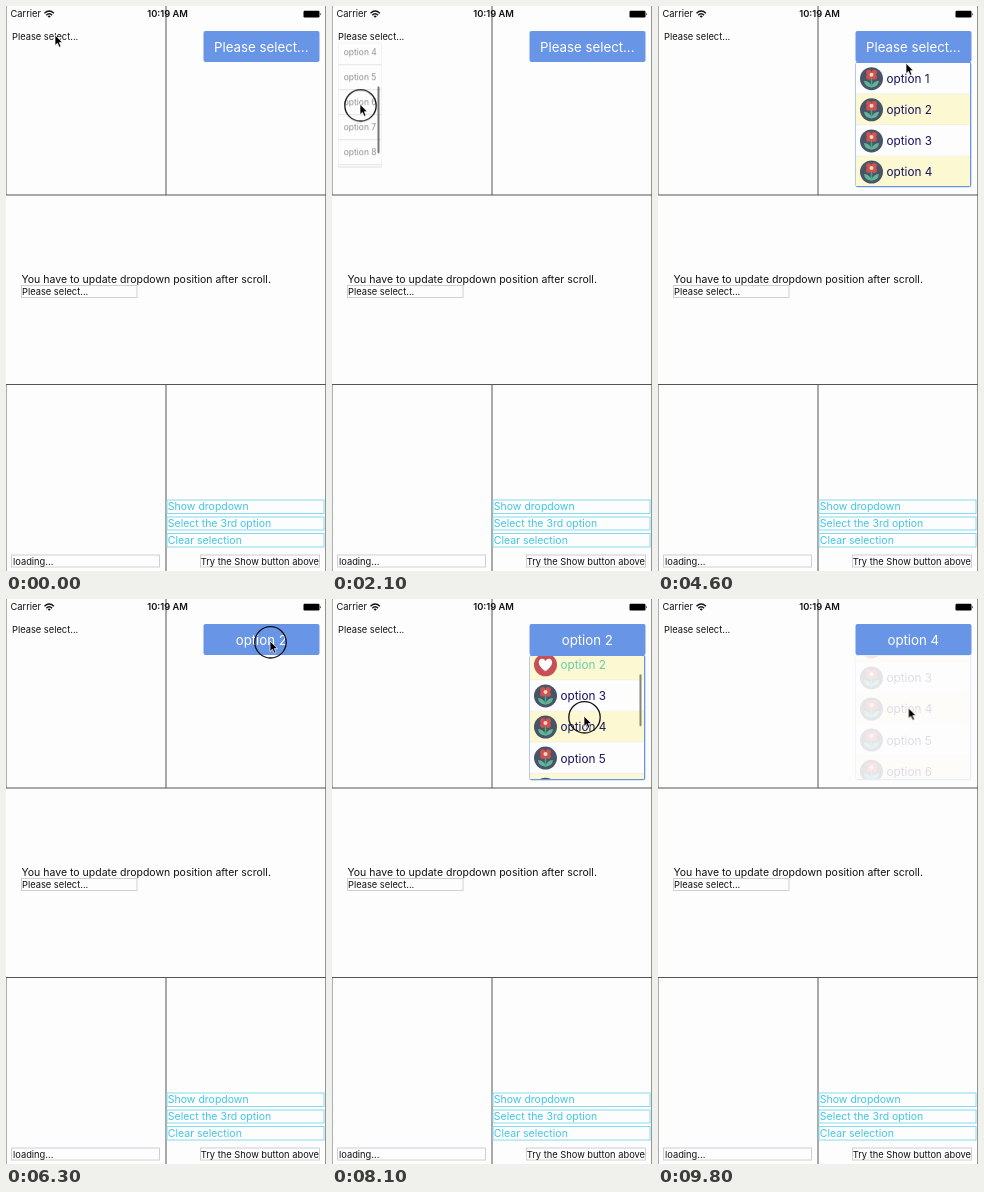
An HTML page that plays this animation: 320x565 px, repeating every 9.9 s.

```html
<!DOCTYPE html>
<html lang="en">
<head>
<meta charset="utf-8">
<title>Dropdown demo</title>
<style>
html, body { margin: 0; width: 100%; height: 100%; overflow: hidden; background: #fefdfe; }
svg { display: block; width: 100%; height: 100%; }
text { font-family: Inter, Roboto, sans-serif; font-size: 9.3px; fill: #111; }
.line { stroke: #555; stroke-width: 1; fill: none; }
.edge { stroke: #8a8a8a; stroke-width: 1; fill: none; }
.box { fill: none; stroke: #d0d0d4; stroke-width: 1; }
.note { font-size: 10.5px; }
.link { font-size: 10.5px; fill: #42c6e2; }
.linkbox { fill: none; stroke: #86dcee; stroke-width: 1; }
.btn text { font-size: 13.25px; fill: #fff; text-anchor: middle; }
.small text { font-size: 8.5px; fill: #8f8f8f; }
.big text { font-size: 11.75px; fill: #16135f; }
.big .picked text { fill: #66cdaa; }

/* 1% = 99 ms */
.anim { animation: 9.9s linear infinite; }
.step { animation-timing-function: step-end; }
.cursor { animation-name: cursor; }
.ring { animation-name: ring; }
.small { animation-name: fadeA; }
.big { animation-name: fadeB; }
.scrollA { animation-name: scrollA; --k: -1px; }
.scrollB { animation-name: scrollB; --k: -1px; }
.barA { --k: .551px; }
.barB { --k: .44px; }
.showA { animation-name: showA; }
.showB { animation-name: showB; }
.label0 { animation-name: label0; }
.label2 { animation-name: label2; }
.label4 { animation-name: label4; }
.picked { animation-name: picked; }

@keyframes cursor {
  0% { transform: translate(49px, 29px); }
  5.05% { transform: translate(49px, 29px); animation-timing-function: ease-in-out; }
  10.1%, 11.1% { transform: translate(28px, 140px); }
  15.2% { transform: translate(28px, 80px); }
  18.2%, 19.2% { transform: translate(28px, 76px); }
  21.21% { transform: translate(28px, 98px); }
  25.25% { transform: translate(28px, 146px); }
  27.3% { transform: translate(28px, 146px); animation-timing-function: ease-in-out; }
  30.2% { transform: translate(97px, 103px); }
  33.3% { transform: translate(97px, 103px); animation-timing-function: ease-in-out; }
  39.4%, 43.4% { transform: translate(252px, 42px); }
  46.46% { transform: translate(248px, 57px); }
  50.5% { transform: translate(245px, 104px); }
  55.6% { transform: translate(245px, 104px); animation-timing-function: ease-in-out; }
  60.6% { transform: translate(264px, 42px); }
  65.7% { transform: translate(264px, 42px); animation-timing-function: ease-in-out; }
  72.7%, 77.8% { transform: translate(252px, 155px); }
  81.82% { transform: translate(252px, 117px); }
  85.9% { transform: translate(252px, 99px); }
  89.9%, 100% { transform: translate(250.5px, 109px); }
}
@keyframes ring {
  0%, 5%, 15.1%, 25.2%, 31.2%, 42.4%, 53.5%, 64.6%, 85.8%, 95.9%, 100% { opacity: 0; }
  3%, 11.1%, 19.1%, 30.2%, 40.3%, 51.5%, 62.5%, 77.7%, 93.9% { opacity: 1; }
}
@keyframes fadeA {
  0%, 5.05%, 33.1%, 100% { opacity: 0; }
  8.1%, 31.3% { opacity: 1; }
}
@keyframes fadeB {
  0%, 42.4%, 56.6%, 64.6%, 99.5%, 100% { opacity: 0; }
  45.4%, 53.5%, 67.7%, 96% { opacity: 1; }
}
@keyframes scrollA {
  0%, 11.1%, 28.3%, 100% { transform: translateY(0); }
  15.2% { transform: translateY(calc(60 * var(--k))); animation-timing-function: ease-out; }
  17.2%, 19.2% { transform: translateY(calc(100 * var(--k))); }
  21.21% { transform: translateY(calc(78 * var(--k))); }
  25.25% { transform: translateY(calc(30 * var(--k))); animation-timing-function: ease-out; }
}
@keyframes scrollB {
  0%, 77.8% { transform: translateY(0); }
  81.82% { transform: translateY(calc(38 * var(--k))); }
  85.9%, 100% { transform: translateY(calc(56 * var(--k))); }
}
@keyframes showA {
  0%, 11%, 30%, 100% { opacity: 0; }
  11.1%, 28.3% { opacity: 1; }
}
@keyframes showB {
  0%, 77.7%, 89%, 100% { opacity: 0; }
  77.8%, 87% { opacity: 1; }
}
@keyframes label0 { 0% { opacity: 1; } 53.5%, 100% { opacity: 0; } }
@keyframes label2 { 0%, 96%, 100% { opacity: 0; } 53.5% { opacity: 1; } }
@keyframes label4 { 0% { opacity: 0; } 96%, 100% { opacity: 1; } }
@keyframes picked { 0% { opacity: 0; } 60%, 100% { opacity: 1; } }
</style>
</head>
<body>
<svg viewBox="0 0 320 565" preserveAspectRatio="none">
  <defs>
    <clipPath id="clipA"><rect x="6" y="37" width="44" height="124"/></clipPath>
    <clipPath id="clipB"><rect x="198.5" y="57" width="113.5" height="123"/></clipPath>
    <g id="flower">
      <circle r="11.5" fill="#475567"/>
      <path d="M0-2V9" stroke="#4fa184" stroke-width="1.6"/>
      <path d="M0 8.5Q-7 8-7.5 2Q-1 2.500 0 8.500Q1 2.500 7.500 2Q7 8 0 8.500Z" fill="#5fb597"/>
      <g fill="#d2504f">
        <circle cx="-2.700" cy="-6.200" r="2.700"/><circle cx="2.700" cy="-6.200" r="2.700"/>
        <circle cx="-2.700" cy="-1.800" r="2.700"/><circle cx="2.700" cy="-1.800" r="2.700"/>
      </g>
      <circle cy="-4" r="2" fill="#f3d9bd"/>
    </g>
    <g id="heart">
      <circle r="11.5" fill="#c84f58"/>
      <path d="M0 6.500C-10-.5-6.500-6-3.500-6C-1.500-6-.5-5 0-3.500C.5-5 1.500-6 3.500-6C6.500-6 10-.5 0 6.500Z" fill="#fff"/>
    </g>
  </defs>
  <rect width="320" height="565" fill="#fefdfe"/>

  <path class="edge" d="M.2 0V189M.2 378V565M319.600 0V565"/>
  <path class="line" d="M160 0V189M160 378V565M0 189H320M0 378.500H320"/>

  <text x="4.500" y="11.300">Carrier</text>
  <g fill="none" stroke="#111" stroke-width="1.400">
    <path d="M38.500 7.300Q43.200 2.900 47.900 7.300M40.300 9.200Q43.200 6.500 46.100 9.200"/>
  </g>
  <path d="M41.600 10.200Q43.200 8.900 44.800 10.200L43.200 11.800Z" fill="#111"/>
  <text x="161.500" y="11.300" text-anchor="middle" font-weight="600">10:19 AM</text>
  <rect x="297.500" y="4.700" width="16" height="6.800" rx="1.200" fill="#000"/>
  <path d="M314.300 6.700Q316 8.100 314.300 9.500Z" fill="#000"/>

  <text x="6" y="34.200">Please select...</text>
  <text class="note" x="15.500" y="276.800">You have to update dropdown position after scroll.</text>
  <rect class="box" x="15.500" y="279.500" width="115.500" height="12"/>
  <text x="16" y="289.300">Please select...</text>
  <rect class="box" x="5.500" y="549" width="148" height="12"/>
  <text x="7" y="558.500">loading...</text>
  <rect class="box" x="194.500" y="549" width="119" height="12"/>
  <text x="313" y="558.500" text-anchor="end">Try the Show button above</text>

  <rect class="linkbox" x="161" y="494" width="157" height="13.500"/>
  <rect class="linkbox" x="161" y="511" width="157" height="13"/>
  <rect class="linkbox" x="161" y="527.500" width="157" height="13.500"/>
  <text class="link" x="161.800" y="504.300">Show dropdown</text>
  <text class="link" x="161.800" y="521.200">Select the 3rd option</text>
  <text class="link" x="161.800" y="537.900">Clear selection</text>

  <g class="btn">
    <rect x="197.500" y="25" width="116" height="31" rx="2" fill="#6995e6"/>
    <text class="anim step label0" x="255.300" y="45.800">Please select...</text>
    <text class="anim step label2" x="255.300" y="45.800">option 2</text>
    <text class="anim step label4" x="255.300" y="45.800">option 4</text>
  </g>

  <g class="anim small">
    <rect x="6.500" y="37" width="43" height="124" fill="#fefdfe" stroke="#ececee" stroke-width=".6"/>
    <g clip-path="url(#clipA)">
      <g class="anim scrollA" id="rowsA"></g>
      <g class="anim showA"><rect class="anim scrollA barA" x="45.500" y="37.500" width="2" height="67" rx="1" fill="#777"/></g>
    </g>
    <path d="M6.500 161H49.500" stroke="#dedee0" stroke-width=".8"/>
  </g>

  <g class="anim big">
    <rect x="198.300" y="56.500" width="114.200" height="124" rx="1.500" fill="#fefdfe" stroke="#6995e6" stroke-width="1.600"/>
    <g clip-path="url(#clipB)">
      <g class="anim scrollB" id="rowsB"></g>
      <g class="anim showB"><rect class="anim scrollB barB" x="307.500" y="58.500" width="2" height="52" rx="1" fill="#8a8577"/></g>
    </g>
  </g>

  <g class="anim cursor">
    <circle class="anim step ring" cx=".5" cy="1.300" r="15.700" fill="none" stroke="#111" stroke-width="1.300"/>
    <path d="M0 0V10.500L2.400 8.300L4.200 12.200L6 11.400L4.300 7.600H7.500Z" fill="#000" stroke="#fff" stroke-width=".7"/>
  </g>
</svg>
<script>
const COUNT = 9;
const fill = (id, row) => {
  document.getElementById(id).innerHTML = Array.from({ length: COUNT }, (_, i) => row(i)).join('');
};

const plainRow = i => `<text x="11.700" y="${52.1 + 25 * i}">option ${i + 1}</text>
  <path d="M6.500 ${61.5 + 25 * i}H49.500" stroke="#dcdcde" stroke-width=".8"/>`;

const iconRow = (i, icon = 'flower') => {
  const y = 57 + 31.1 * i;
  return `<rect x="198" y="${y}" width="115" height="31.100" fill="${i % 2 ? '#fcf8d2' : '#fefdfe'}"/>
    <path d="M198 ${y + 31}H313" stroke="#dfe4ee" stroke-width=".7"/>
    <use href="#${icon}" x="213.500" y="${y + 15.7}"/>
    <text x="228.500" y="${y + 20.1}">option ${i + 1}</text>`;
};

fill('rowsA', plainRow);
fill('rowsB', i => iconRow(i) +
  (i === 1 ? `<g class="anim step picked">${iconRow(i, 'heart')}</g>` : ''));
</script>
</body>
</html>
```
